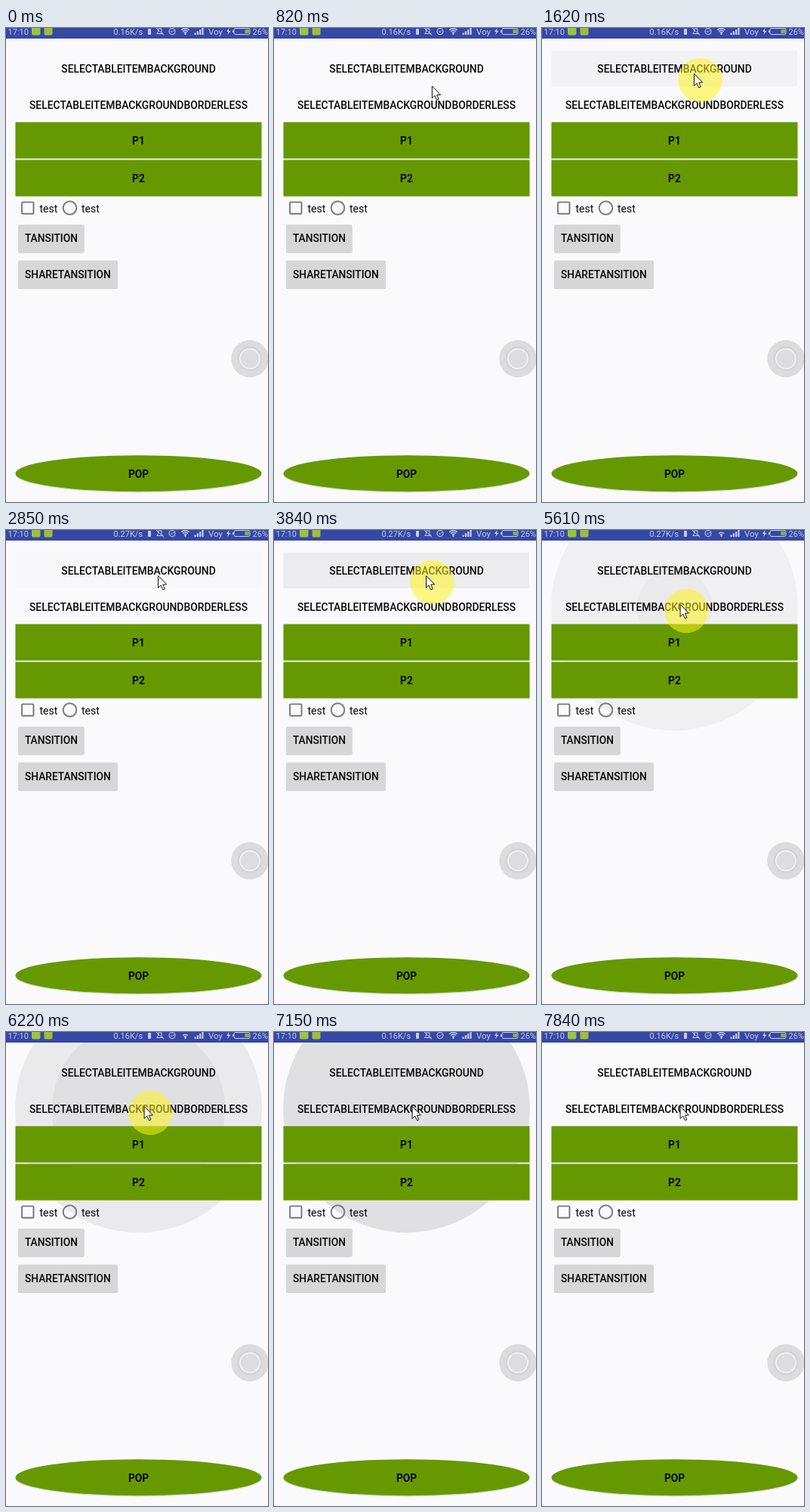
Animation of 347 by 627 pixels, one loop 8000 ms. Source, as an HTML page with a canvas:

```html
<!DOCTYPE html>
<html lang="en">
<head>
<meta charset="utf-8">
<title>Ripple demo</title>
<style>
  html, body { margin: 0; width: 100%; height: 100%; overflow: hidden; background: #fafafc; }
  canvas { display: block; }
</style>
</head>
<body>
<canvas id="stage" width="347" height="627"></canvas>
<script>
const ctx = document.getElementById('stage').getContext('2d');
const LOOP = 8000;
const GREEN = '#669900', LIGHT = '#c6cceb', INK = '#080808';

const ITEM = { x: 201, y: 60 }, BORDERLESS = { x: 182.6, y: 98 };
const presses = [
  { down: 1230, up: 2380, target: 'item' },
  { down: 3165, up: 4070, target: 'item' },
  { down: 5140, up: 7150, target: 'borderless' }
];

const clamp = v => Math.min(1, Math.max(0, v));
const progress = (t, from, to) => clamp((t - from) / (to - from));
const mix = (a, b, p) => a + (b - a) * p;
const smooth = p => p * p * (3 - 2 * p);
const within = (t, from, to) => t >= from && t < to;

function text(str, x, y, { size = 13.75, weight = 500, color = INK, align = 'left' } = {}) {
  ctx.font = `${weight} ${size}px Roboto, sans-serif`;
  ctx.textAlign = align;
  ctx.fillStyle = color;
  ctx.fillText(str, x, y);
}

function rect(x, y, w, h, color) {
  ctx.fillStyle = color;
  ctx.fillRect(x, y, w, h);
}

function roundRect(x, y, w, h, r, color) {
  ctx.beginPath();
  ctx.roundRect(x, y, w, h, r);
  ctx.fillStyle = color;
  ctx.fill();
}

function frame(x, y, w, h, r, width, color) {
  ctx.beginPath();
  ctx.roundRect(x, y, w, h, r);
  ctx.lineWidth = width;
  ctx.strokeStyle = color;
  ctx.stroke();
}

function ellipse(x, y, rx, ry, color) {
  ctx.beginPath();
  ctx.ellipse(x, y, rx, ry, 0, 0, Math.PI * 2);
  ctx.fillStyle = color;
  ctx.fill();
}

function ring(x, y, r, width, color) {
  ctx.beginPath();
  ctx.arc(x, y, r, 0, Math.PI * 2);
  ctx.lineWidth = width;
  ctx.strokeStyle = color;
  ctx.stroke();
}

function path(points, color, width) {
  ctx.beginPath();
  points.forEach(([x, y]) => ctx.lineTo(x, y));
  if (width) {
    ctx.lineWidth = width;
    ctx.strokeStyle = color;
    ctx.stroke();
  } else {
    ctx.closePath();
    ctx.fillStyle = color;
    ctx.fill();
  }
}

function pressLevel(t, press) {
  if (t < press.down) return 0;
  const fade = 1 - progress(t, press.up, press.up + 690);
  return progress(Math.min(t, press.up), press.down, press.down + 780) * fade * fade;
}

function drawRipples(t) {
  for (const press of presses) {
    const level = pressLevel(t, press);
    if (!level) continue;
    const shade = `rgba(0,0,0,${0.064 * level})`;
    if (press.target === 'item') {
      rect(12.5, 29.5, 325.5, 47.5, shade);
    } else {
      ellipse(175.5, 102, 163.5, 163.5, shade);
      const r = 163.5 * progress(t, press.down, press.down + 1540);
      ellipse(175.5, 102, r, r, `rgba(0,0,0,${0.042 * level})`);
    }
  }
}

function drawGreenBar(label, y) {
  rect(12.5, y + 1, 326, 48, '#dfe4d2');
  rect(12.5, y, 326, 48, GREEN);
  text(label, 175.5, y + 29.5, { weight: 700, align: 'center' });
}

function drawGreyButton(label, y, w, h) {
  roundRect(16, y + 0.8, w, h, 2, '#cfcfd1');
  roundRect(16, y, w, h, 2, '#d7d7d8');
  text(label, 25, y + 23);
}

function drawPage() {
  const title = { size: 13.87, align: 'center' };
  text('SELECTABLEITEMBACKGROUND', 175.5, 59, title);
  text('SELECTABLEITEMBACKGROUNDBORDERLESS', 175.5, 106.5, title);
  drawGreenBar('P1', 124.5);
  drawGreenBar('P2', 174.5);

  frame(21.1, 230.4, 15.4, 15.4, 1, 1.9, '#777');
  ring(84.5, 238, 8.8, 1.9, '#777');
  const plain = { size: 14, weight: 400 };
  text('test', 44.5, 243.5, plain);
  text('test', 100, 243.5, plain);

  drawGreyButton('TANSITION', 260, 87.5, 37);
  drawGreyButton('SHARETANSITION', 307.5, 132, 37);

  ellipse(175.5, 590.5, 163, 24, '#d6d8d0');
  ellipse(175.5, 589.2, 163, 24, GREEN);
  text('POP', 175.5, 594.5, { weight: 700, align: 'center' });

  ellipse(323, 437.5, 24.7, 24.7, '#dcdcde');
  ellipse(323, 437.5, 16.5, 16.5, '#d5d5d7');
  ellipse(323, 437.5, 13, 13, '#dddddf');
  ring(323, 437.5, 13, 1.5, '#f5f5f7');
}

function drawStatusBar(t) {
  rect(0, 0, 347, 14, '#3648a6');
  const style = { size: 11, weight: 400, color: LIGHT };
  text('17:10', 2.5, 8.5, style);
  roundRect(34, -2, 11.5, 11.5, 2, '#9ac53c');
  roundRect(50.5, -2, 11, 11.5, 2, '#a2bd32');
  text(within(t, 2230, 6200) ? '0.27K/s' : '0.16K/s', 142.5, 8.5, style);
  roundRect(188, 1, 4, 8, 1, LIGHT);

  // muted bell
  path([[199.5, 7.5], [201.5, 5.5], [201.5, 1], [206, 1], [206, 5.5], [208, 7.5], [199.5, 7.5]], LIGHT, 1);
  path([[199, 0], [209, 9.5]], LIGHT, 1);

  // alarm clock
  ring(220, 4.5, 4, 1.1, LIGHT);
  path([[218, 4], [220, 5.5], [222.5, 3]], LIGHT, 1);

  // wifi
  const arcs = within(t, 4500, 6500) ? [2.6, 4.8] : [2.6, 5, 7.4];
  ctx.lineWidth = 1.4;
  ctx.strokeStyle = LIGHT;
  for (const r of arcs) {
    ctx.beginPath();
    ctx.arc(237.5, 8, r, Math.PI * 1.25, Math.PI * 1.75);
    ctx.stroke();
  }
  ellipse(237.5, 7.8, 1.2, 1.2, LIGHT);

  // signal bars
  const weak = within(t, 2080, 2230) || within(t, 6900, 7150);
  for (let i = 0; i < 4; i++) {
    const h = 2.5 + i * 2.2;
    rect(249.5 + i * 3.3, 9 - h, 2.2, h, weak && i === 3 ? '#6e7cc0' : LIGHT);
  }

  text('Voy', 268, 8.5, { ...style, size: 11.5 });
  path([[295.5, 0], [292, 5], [294.5, 5], [293, 9.5], [297.5, 3.7], [295, 3.7]], LIGHT);
  frame(302, 0.5, 21, 8, 2, 1, LIGHT);
  rect(300, 3, 1.5, 3, LIGHT);
  rect(316.5, 2, 5.5, 5, '#86b53a');
  text('26%', 326.5, 8.5, style);
}

function pointerAt(t) {
  if (t < 980) {
    const p = smooth(progress(t, 170, 980)), q = 1 - p;
    const curve = (a, b, c) => q * q * a + 2 * q * p * b + p * p * c;
    return { x: curve(283, 240, ITEM.x), y: curve(604, 120, ITEM.y) };
  }
  const p = smooth(progress(t, 4350, 4920));
  return { x: mix(ITEM.x, BORDERLESS.x, p), y: mix(ITEM.y, BORDERLESS.y, p) };
}

function drawPointer(t) {
  if (t < 210) return;
  const { x, y } = pointerAt(t);
  if (presses.some(p => within(t, p.down, p.up))) {
    ellipse(x + 8.5, y + 9, 29.2, 29.2, 'rgba(255,246,25,0.53)');
  }
  ctx.save();
  ctx.translate(x + 0.5, y + 0.5);
  ctx.beginPath();
  [[0, 0], [0, 16], [3.7, 12.6], [6.3, 18.5], [8.8, 17.4], [6.3, 11.7], [11.3, 11.5]]
    .forEach(([px, py]) => ctx.lineTo(px, py));
  ctx.closePath();
  ctx.fillStyle = '#fff';
  ctx.fill();
  ctx.lineWidth = 1;
  ctx.strokeStyle = '#111';
  ctx.stroke();
  ctx.restore();
}

function draw(t) {
  rect(0, 0, 347, 627, '#fafafc');
  drawRipples(t);
  drawPage();
  drawStatusBar(t);
  drawPointer(t);
}

const start = performance.now();
function tick() {
  draw((performance.now() - start) % LOOP);
  requestAnimationFrame(tick);
}
tick();
</script>
</body>
</html>
```
